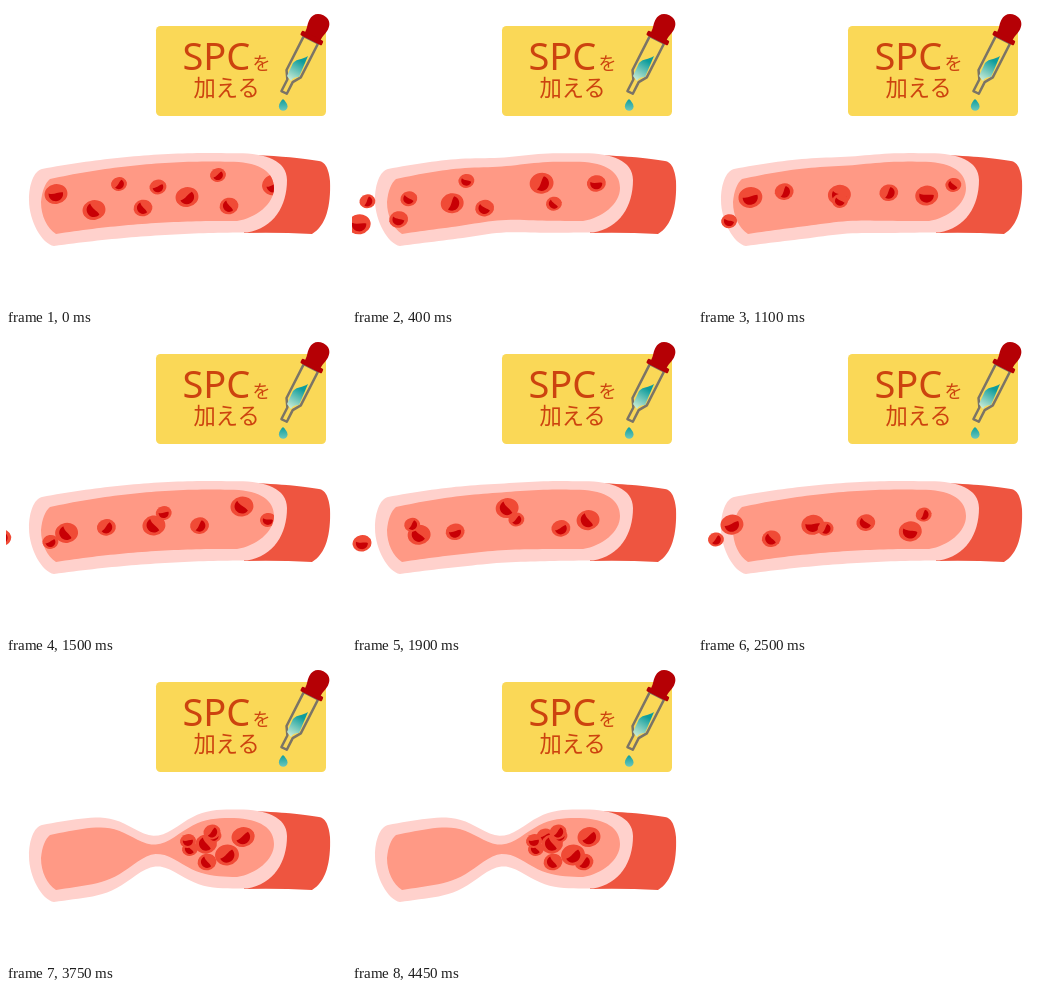
These frames come from a looping animation (340x300 px, 5.5 s). An HTML page:

```html
<!DOCTYPE html>
<html lang="ja">
<head>
<meta charset="utf-8">
<style>
  html, body { margin: 0; width: 100%; height: 100%; overflow: hidden; background: #fff; }
  svg { display: block; width: 340px; height: 300px; }
  text { fill: #cc430f; font-family: "Noto Sans CJK JP", "Noto Sans CJK", "Noto Sans", sans-serif; font-weight: 500; }
  .latin { font-family: "Noto Sans", "Open Sans", sans-serif; }
</style>
</head>
<body>
<svg viewBox="0 0 340 300">
  <defs>
    <linearGradient id="teal" x1="0.8" y1="0" x2="0.3" y2="1">
      <stop offset="0.2" stop-color="#0d9c9c"/>
      <stop offset="1" stop-color="#c4e9d3"/>
    </linearGradient>
    <linearGradient id="dropFill" x1="0" y1="0" x2="0" y2="1">
      <stop offset="0" stop-color="#0d9c9c"/>
      <stop offset="1" stop-color="#6cc8bd"/>
    </linearGradient>
    <clipPath id="opening">
      <path d="M-20,120H228V156C254,157 268,166 268,182C268,198 250,212 231,215V260H-20Z"/>
    </clipPath>
  </defs>

  <rect x="150" y="20" width="170" height="90" rx="4.500" fill="#fad857"/>
  <text class="latin" x="176.500" y="64" font-size="38">SPC</text>
  <text x="246.500" y="63.500" font-size="18">を</text>
  <text x="187.500" y="90" font-size="22.300">加える</text>

  <g transform="translate(314 16) rotate(27)">
    <path d="M-8,20V58L-3,66V79H3V66L8,58V20Z" fill="none" stroke="#7b7466" stroke-width="2.500" stroke-linejoin="round"/>
    <path d="M-9,17C-8,12 -10.500,8 -10.500,3C-10.500,-4 -6,-7.500 0,-7.500S10.500,-4 10.500,3C10.500,8 8,12 9,17Z" fill="#b50005"/>
    <rect x="-12" y="15.500" width="24" height="5" rx="1.500" fill="#b50005"/>
  </g>
  <path d="M287,57C292,52 296,54 302,50L293,71Q287,71 285,75L281,70Z" fill="url(#teal)"/>
  <path d="M277,93C279,95 281.500,97.500 281.500,100.500A4.300,4.300 0 0 1 272.900,100.500C272.900,97.500 275,95 277,93Z" fill="url(#dropFill)"/>

  <path d="M236,149L258,149.500C285,151 300,153 313,155Q322,156 324,175C325,200 320,220 306,228Q270,226 238,227Z" fill="#ee5540"/>
  <path id="wall" fill="#ffd1cc"/>
  <path id="lumen" fill="#ff9985"/>
  <g id="cells" clip-path="url(#opening)"></g>
</svg>
<script>
const LOOP = 5500, STEP = 50, SETTLED = 4450;
const CLOSING = 2500, CLOSED = 3600;
const NECK = 150, NECK_WIDTH = 24, NECK_DEPTH = 25;
const $ = id => document.getElementById(id);
const mix = (a, b, k) => a + (b - a) * k;

// Parabolic edge from x = left to right, bent toward the axis at the neck (side 1 = down)
const edge = (left, right, peak, y, rise, side) => ({
  left, right,
  at: (x, k) => y + rise * ((peak - x) / (peak - left)) ** 2
    + side * k * NECK_DEPTH * Math.exp(-(((x - NECK) / NECK_WIDTH) ** 2) / 2)
});

const wall = {
  top: edge(36, 230, 205, 147, 16, 1),
  right: "C258,147 281,154 281,174C281,200 268,222 241,226.5",
  bottom: edge(48, 241, 241, 226.5, 13.5, -1),
  left: "C36,238 23,215 23,194C23,178 28,165 36,163Z"
};
const lumen = {
  top: edge(44, 228, 205, 155.5, 17.5, 1),
  right: "C254,157 268,166 268,182C268,198 250,212 231,215",
  bottom: edge(50, 231, 215, 215, 13, -1),
  left: "C41,222 35,210 35,196C36,185 39,177 44,173Z"
};

// Fading spasms, then a lasting contraction
function squeeze(t) {
  if (t < CLOSING) return .4 * (1 - t / CLOSING) * Math.sin(Math.PI * t / 500) ** 2;
  const rest = Math.max(0, (CLOSED - t) / (CLOSED - CLOSING));
  return 1 - rest * rest;
}

function trace(e, k, reverse) {
  const n = 40, pts = [];
  for (let i = 0; i <= n; i++) {
    const x = mix(e.left, e.right, i / n);
    pts.push(`${x},${e.at(x, k)}`);
  }
  return (reverse ? pts.reverse() : pts).join("L");
}

const outline = (s, k) =>
  `M${trace(s.top, k)}${s.right}L${trace(s.bottom, k, true)}${s.left}`;

function add(tag, attrs, parent) {
  const el = document.createElementNS("http://www.w3.org/2000/svg", tag);
  for (const key in attrs) el.setAttribute(key, attrs[key]);
  return parent.appendChild(el);
}

function makeCell(r, pose) {
  const g = add("g", {}, $("cells"));
  add("ellipse", { rx: r, ry: r * .87, transform: "rotate(-10)", fill: "#f04b36" }, g);
  const core = add("path", {
    d: "M-.65,-.05C-.2,.1 .2,-.2 .6,-.15C.7,.3 .35,.62 0,.62C-.4,.62 -.65,.35 -.65,-.05Z",
    fill: "#c80005"
  }, g);
  return (t, k) => {
    const [x, y, turn] = pose(t, k);
    g.setAttribute("transform", `translate(${x} ${y})`);
    core.setAttribute("transform", `rotate(${turn}) scale(${r})`);
  };
}

const speed = r => .34 - .012 * r; // px per ms, small cells run faster
const tumble = (i, t) => 60 * Math.sin(i * 2 + t / 400);

// A flowing cell keeps its share of the channel height
const flowing = (x0, lane, r, i) => makeCell(r, (t, k) => {
  const x = x0 - speed(r) * t;
  return [x, mix(lumen.top.at(x, k), lumen.bottom.at(x, k), lane), tumble(i, t)];
});

let seed = 7;
const random = () => (seed = seed * 16807 % 2147483647) / 2147483647;

// Cells in view at the start: x, y, radius
const first = [
  [50, 188, 11.5], [88, 204, 11.5], [113, 178, 8], [152, 181, 8.5], [137, 202, 9.5],
  [181, 191, 11.5], [212, 169, 8], [223, 200, 9.5], [268, 179, 12]
].map(([x, y, r], i) => {
  const top = lumen.top.at(x, 0), bottom = lumen.bottom.at(x, 0);
  return flowing(x, (y - top) / (bottom - top), r, i);
});

const stream = Array.from({ length: 16 }, (_, i) => {
  const r = [8, 9.5, 11.5][i % 3];
  const enter = 80 + 145 * i + 60 * random();
  return flowing(280 + speed(r) * enter, mix(.25, .75, random()), r, i);
});

// Trapped cells in order of arrival: resting x, y, radius
const trapped = [
  [182, 179, 8], [184, 187, 8], [206, 170, 8.5], [208, 174, 7.5], [200, 182, 11],
  [221, 193, 12], [237, 175, 11.5], [201, 200, 9.5], [193, 174, 8.5], [232, 200, 9.5]
].map(([x, y, r], i) => [x, y, r, i]).reverse().map(([x, y, r, i]) => {
  const arrive = 2950 + 2 * i ** 3;
  return makeCell(r, t => [
    x + .21 * Math.max(0, arrive - t), y, tumble(i, Math.min(0, t - arrive))
  ]);
});

const cells = [...first, ...stream, ...trapped];

const start = performance.now();
function draw() {
  const now = (performance.now() - start) % LOOP;
  const t = Math.min(Math.floor(now / STEP) * STEP, SETTLED);
  const k = squeeze(t);
  $("wall").setAttribute("d", outline(wall, k));
  $("lumen").setAttribute("d", outline(lumen, k));
  cells.forEach(place => place(t, k));
  requestAnimationFrame(draw);
}
draw();
</script>
</body>
</html>
```
